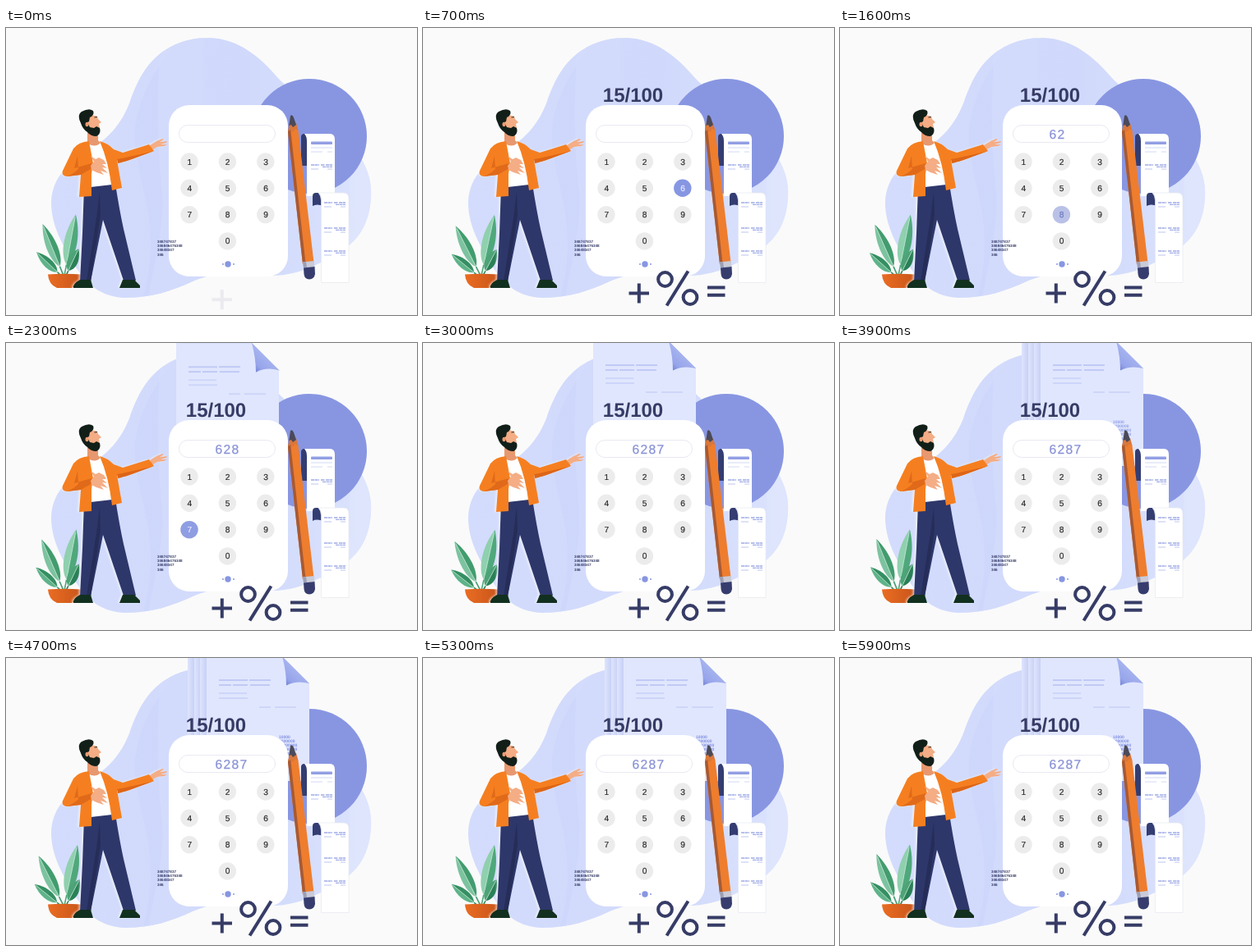
Write an HTML page that moves like this. It is 500x350 px and loops after 6000 ms.

```html
<!DOCTYPE html>
<html lang="en">
<head>
<meta charset="utf-8">
<title>Calculator</title>
<style>
html, body { margin: 0; width: 100%; height: 100%; overflow: hidden; background: #fafafa; }
svg { display: block; width: 500px; height: 350px; }
text { font-family: "Liberation Sans", Arial, sans-serif; text-rendering: geometricPrecision; }
.ink { fill: #363c66; }
.mid { text-anchor: middle; }
#man { filter: drop-shadow(-2px 0 1px rgba(255,255,255,.55)); }
</style>
</head>
<body>
<svg viewBox="0 0 500 350">
  <defs>
    <linearGradient id="blobFill" x1="0" x2="1">
      <stop offset="0" stop-color="#d3dcfc"/><stop offset=".6" stop-color="#d0d9fb"/><stop offset="1" stop-color="#dbe3fd"/>
    </linearGradient>
    <linearGradient id="potFill" x1="0" x2="1">
      <stop offset="0" stop-color="#ea6c22"/><stop offset="1" stop-color="#c9561b"/>
    </linearGradient>
    <linearGradient id="stackFill" gradientUnits="userSpaceOnUse" x1="207" x2="216">
      <stop offset="0" stop-color="#dfe5fd"/><stop offset="1" stop-color="#c4cef5"/>
    </linearGradient>
    <linearGradient id="foldFill" x1="1" y1="0" x2=".2" y2="1">
      <stop offset=".3" stop-color="#b0bcf2"/><stop offset=".85" stop-color="#96a4ea"/><stop offset="1" stop-color="#7988d8"/>
    </linearGradient>
    <path id="blobShape" d="M248 12C282 13 309 35 330 60C355 88 395 95 416 132C431 157 446 176 444 206C442 246 423 265 396 279C369 294 349 303 315 302C276 299 254 297 229 308C201 321 177 329 145 329C116 328 98 313 84 290C69 265 55 241 55 213C56 185 72 167 97 152C126 134 140 117 150 92C162 57 175 37 200 23C215 15 231 12 248 12Z"/>
    <clipPath id="inBlob"><use href="#blobShape"/></clipPath>
  </defs>

  <use href="#blobShape" fill="url(#blobFill)"/>
  <g clip-path="url(#inBlob)">
    <path d="M212 10C182 50 150 95 158 150C166 205 190 250 165 335H240V10Z" fill="#c9d3f9" opacity=".4"/>
    <path d="M188 20C183 90 184 150 190 200C193 245 180 285 172 335H240V10Z" fill="#d5ddfc" opacity=".75"/>
    <path d="M422 140C414 190 424 225 412 285H450V140Z" fill="#e0e7fe" opacity=".7"/>
  </g>
  <circle cx="369" cy="132" r="70" fill="#8896e2"/>

  <g id="sheets"></g>
  <g id="figures" fill="#7f8fe2" font-size="5" font-weight="bold"></g>
  <text id="ratio" class="ink mid" x="255.500" y="89.700" font-size="24" font-weight="bold">15/100</text>

  <g id="receipts">
    <path d="M359 133Q359 129 363 129H371V168H359Z" fill="#333d72"/>
    <path d="M366 129H394Q400 129 400 136V205H366V138Q366 132 363 129Z" fill="#fff"/>
    <path d="M373 205Q373 201 377 201H386V217Q378 214 373 217Z" fill="#333d72"/>
    <path d="M382 201H411Q417 201 417 208V310.500H383.500V210Q383 204 380 201Z" fill="#fff" stroke="#e6e8f0" stroke-width=".7"/>
    <rect x="371" y="138.500" width="26" height="3.400" rx="1" fill="#929fe4"/>
    <g id="rows" stroke="#a0ace6" stroke-width="1.300"></g>
  </g>

  <rect x="198" y="94" width="145" height="209" rx="25" fill="#fff"/>
  <rect x="210.500" y="118.500" width="117" height="21" rx="10.500" fill="#fff" stroke="#e8eaf3"/>
  <text id="entry" x="254.500" y="134.800" font-size="15.600" letter-spacing="1.300" fill="#8891d6" stroke="#8891d6" stroke-width=".250"></text>
  <g id="keys" font-size="10.200"></g>
  <g fill="#8796e2"><circle cx="264" cy="288" r="1"/><circle cx="270" cy="288" r="3.700"/><circle cx="277" cy="288" r="1"/></g>
  <g id="notes" class="ink" font-size="4.600" font-weight="bold"></g>

  <g id="pencil">
    <path d="M343 127L347 108L355.500 125L374.500 286L361 288Z" fill="#ee7d2e"/>
    <path d="M343 127L346 112L346.500 127L364.500 287L361 288Z" fill="#a55a36"/>
    <path d="M343.500 126L345 114L353 116L355.500 125L352 123L349 127L346.500 124Z" fill="#d9773c"/>
    <path d="M344.300 119L346 107Q348 105 350 109L353 118L349 121L347 118Z" fill="#4b4a59"/>
    <path d="M361 285.500L374.500 284L375.500 291L362 292.500Z" fill="#c9cbd8"/>
    <path d="M361 285.500L365 285L366 292L362 292.500Z" fill="#9c9fb4"/>
    <path d="M362 292.500L375.500 291L376 300Q375 306 369 306.500Q363 306 362.500 300Z" fill="#363d6e"/>
  </g>

  <g id="plant"></g>
  <path d="M51 300.500Q71 299 91 300.500Q90 314 80 317H62Q52 313 51 300.500Z" fill="url(#potFill)"/>

  <g id="man">
    <path d="M95 194L133 190Q138 222 143 245L158 308H143L118 234L103 309H90L93 250Z" fill="#2e376a"/>
    <path d="M114 200L115 228L103 309H98L110 232Z" fill="#252d58"/>
    <path d="M90 307H103L106 317H82Q81 312 90 307ZM142 307H156L163 314V317H138Z" fill="#12301f"/>
    <path d="M99 120L112 125L112 137Q119 143 112 147L99 143Z" fill="#e8986f"/>
    <path d="M100 141Q109 147 116 139L126 164L129 191L103 194Z" fill="#fff"/>
    <path d="M175 143L183 138L190 135L192 136L187 139L196 138L195 140L188 142L196 142L192 144L184 145L177 149Z" fill="#f4ad85"/>
    <path d="M114 138Q123 140 131 148L142 152L174 142L180 150L150 161Q141 164 135 161L141 195L129 198Q125 163 114 138Z" fill="#f57f20"/>
    <path d="M135 160Q146 158 180 150L150 161Q141 164 136 165Z" fill="#dd6517"/>
    <path d="M101 138Q88 139 82 147L69 174Q67 180 74 181L91 179L89 206L104 205L104 178L106 165Z" fill="#f57f20"/>
    <path d="M87 156L83 171L104 165L105 171L91 179L74 181Q82 178 88 172Z" fill="#e06a1a"/>
    <path d="M103 168L107 163L103 156L109 160L113 158L119 161L122 166L117 166L123 171L117 170L124 177L115 174L119 179L110 176L104 173Z" fill="#f4ad85"/>
    <path d="M97 110Q105 104 111 108L112 111L116 115L113 117L114 122Q108 129 99 124Z" fill="#f4ad85"/>
    <path d="M91 116Q86 106 92 102Q101 97 106 101Q108 106 102 109L101 114L99 115L102 121L107 122L110 120L114 122Q116 129 110 132Q103 132 99 127Q93 123 91 116Z" fill="#121f19"/>
    <ellipse cx="98.500" cy="117.500" rx="2" ry="2.800" fill="#ed9b73"/>
    <path d="M107.500 109L111 108.500" stroke="#121f19" stroke-width=".9"/>
  </g>

  <g id="signs" fill="none" stroke="#363c66" stroke-width="4">
    <path d="M250.500 323.500H275M262.800 311.500V335.500"/>
    <g><circle cx="294.500" cy="306.500" r="8.400"/><circle cx="325" cy="328.500" r="8.400"/><path d="M296.500 338.500L322.500 296.500"/></g>
    <path d="M346 316.500H367.500M346 325.800H367.500"/>
  </g>
</svg>
<script>
const NS = 'http://www.w3.org/2000/svg';
const $ = id => document.getElementById(id);
const LOOP = 6000, STEP = 100;

function add(parent, tag, attrs, text) {
  const el = document.createElementNS(NS, tag);
  for (const k in attrs) el.setAttribute(k, attrs[k]);
  if (text !== undefined) el.textContent = text;
  return parent.appendChild(el);
}
const clamp = v => Math.max(0, Math.min(1, v));
const part = (t, start, length) => clamp((t - start) / length);
const easeOut = p => 1 - (1 - p) ** 3;
const easeInOut = p => p * p * (3 - 2 * p);
const move = (el, x, y) => el.setAttribute('transform', `translate(${x} ${y})`);

// Keypad
const keys = [1, 2, 3, 4, 5, 6, 7, 8, 9, 0].map((n, i) => {
  const x = n ? 223 + (i % 3) * 46.4 : 269.4;
  const y = 163 + Math.floor(i / 3) * 32.3;
  add($('keys'), 'circle', { cx: x, cy: y, r: 10.7, fill: '#ececec' });
  const glow = add($('keys'), 'circle', { cx: x, cy: y, r: 10.7, fill: '#8796e2', opacity: 0 });
  const label = add($('keys'), 'text', { x: x + .3, y: y + 3.5, class: 'mid', 'stroke-width': .2 }, n);
  return { n, glow, label };
});
const presses = [[6, 700], [2, 1200], [8, 1750], [7, 2250]];

// Sheets, back to front: final shift to the right
const sheets = [14, 22, 29, 37].map((shift, i, all) => {
  const front = i === all.length - 1;
  const g = add($('sheets'), 'g', {});
  add(g, 'path', { d: 'M207 -2H299L332 31V150H207Z', fill: front ? '#e0e6fd' : 'url(#stackFill)' });
  add(g, 'path', { d: 'M299 -2L332 31Q316 27 304 33.500Q304 16 299 -2Z', fill: 'url(#foldFill)' });
  if (front) {
    const bars = [[222, 27, 35], [259, 27, 26], [222, 33, 15], [239, 33, 18], [260, 33, 24],
      [222, 43, 34], [222, 49, 35], [271, 60, 14], [290, 60, 26]];
    for (const [x, y, w] of bars)
      add(g, 'path', { d: `M${x} ${y}h${w}`, stroke: y < 40 ? '#c0caf5' : '#cdd6f9', 'stroke-width': 2 });
  }
  return { g, shift };
});

['10000', '0000000', '00000000', '00000000', '0000000'].forEach((s, i) =>
  add($('figures'), 'text', { x: 332, y: 97.5 + i * 5 }, s));
['348747837', '346846476348', '34648347', '346'].forEach((s, i) =>
  add($('notes'), 'text', { x: 184, y: 262 + i * 5.2 }, s));

// Receipt print: left edge, top
for (const [x, y] of [[371, 167], [387, 213], [387, 244], [387, 272]]) {
  add($('rows'), 'path', { d: `M${x} ${y}h10m2 0h5m1 0h8M${x + 14} ${y + 2.3}h12`, 'stroke-dasharray': '4 .5' });
  add($('rows'), 'path', { d: `M${x} ${y + 5}h9m11 0h6`, opacity: .45 });
}
add($('rows'), 'path', { d: 'M371 146h26M371 151h14m6 0h6', opacity: .3 });

// Leaves: base x, base y, angle, length, half width, sway, light, dark
const leaves = [
  [70, 302, -22, 68, 8.5, -5.7, '#7cc39f', '#429c6e'],
  [71, 302, 10.5, 76, 10, 2, '#8fd0ae', '#4fa87b'],
  [68, 303, -46, 43, 7, -6, '#5fb389', '#358f62'],
  [73, 302, 25, 36, 8, 3, '#4da377', '#2a8056']
].map(([x, y, angle, len, w, sway, light, dark]) => {
  const g = add($('plant'), 'g', {});
  const foot = -len * .18;
  const half = s => `M0 ${foot}C${s * w * .9} ${-len * .3} ${s * w * 1.2} ${-len * .65} 0 ${-len}Z`;
  add(g, 'path', { d: `M0 0V${foot}`, stroke: dark, 'stroke-width': 1.6 });
  add(g, 'path', { d: half(-1), fill: light });
  add(g, 'path', { d: half(1), fill: dark });
  add(g, 'path', { d: `M0 ${foot}V${-len * .95}`, stroke: '#d9f3e5', 'stroke-width': .7, opacity: .8 });
  return { g, x, y, angle, sway };
});

function draw(t) {
  const sway = (1 - Math.cos(t / 2000 * 2 * Math.PI)) / 2;
  for (const l of leaves)
    l.g.setAttribute('transform', `translate(${l.x} ${l.y}) rotate(${l.angle + l.sway * sway})`);

  [...$('signs').children].forEach((sign, i) => {
    const p = part(t, i * 110 - 50, 600);
    sign.setAttribute('opacity', easeInOut(Math.min(1, p * 2)));
    move(sign, 0, 10 * (1 - easeOut(p)));
  });

  const r = part(t, 80, 580);
  $('ratio').setAttribute('opacity', r ? 1 : 0);
  move($('ratio'), 0, 25 * (1 - easeOut(r)));

  for (const k of keys) {
    const hit = presses.find(p => p[0] === k.n);
    const glow = hit ? easeInOut(clamp(1 - Math.abs(t - hit[1]) / 300)) : 0;
    const tone = glow > .75 ? '#e9ecff' : glow > .2 ? '#6b78be' : '#2b2b2b';
    k.glow.setAttribute('opacity', glow);
    k.label.setAttribute('fill', tone);
    k.label.setAttribute('stroke', tone);
  }
  $('entry').textContent = presses.filter(p => t >= p[1] + 150).map(p => p[0]).join('');

  const rise = 100 * (1 - easeOut(part(t, 1650, 900)));
  const fan = easeInOut(part(t, 3000, 800));
  for (const s of sheets) move(s.g, s.shift * fan, rise);

  const f = part(t, 3600, 700);
  $('figures').setAttribute('opacity', easeOut(f));
  move($('figures'), 0, 5 * (1 - easeOut(f)));
}

const start = performance.now();
function tick() {
  const t = (performance.now() - start) % LOOP;
  draw(Math.floor(t / STEP) * STEP);
  requestAnimationFrame(tick);
}
draw(0);
requestAnimationFrame(tick);
</script>
</body>
</html>
```
